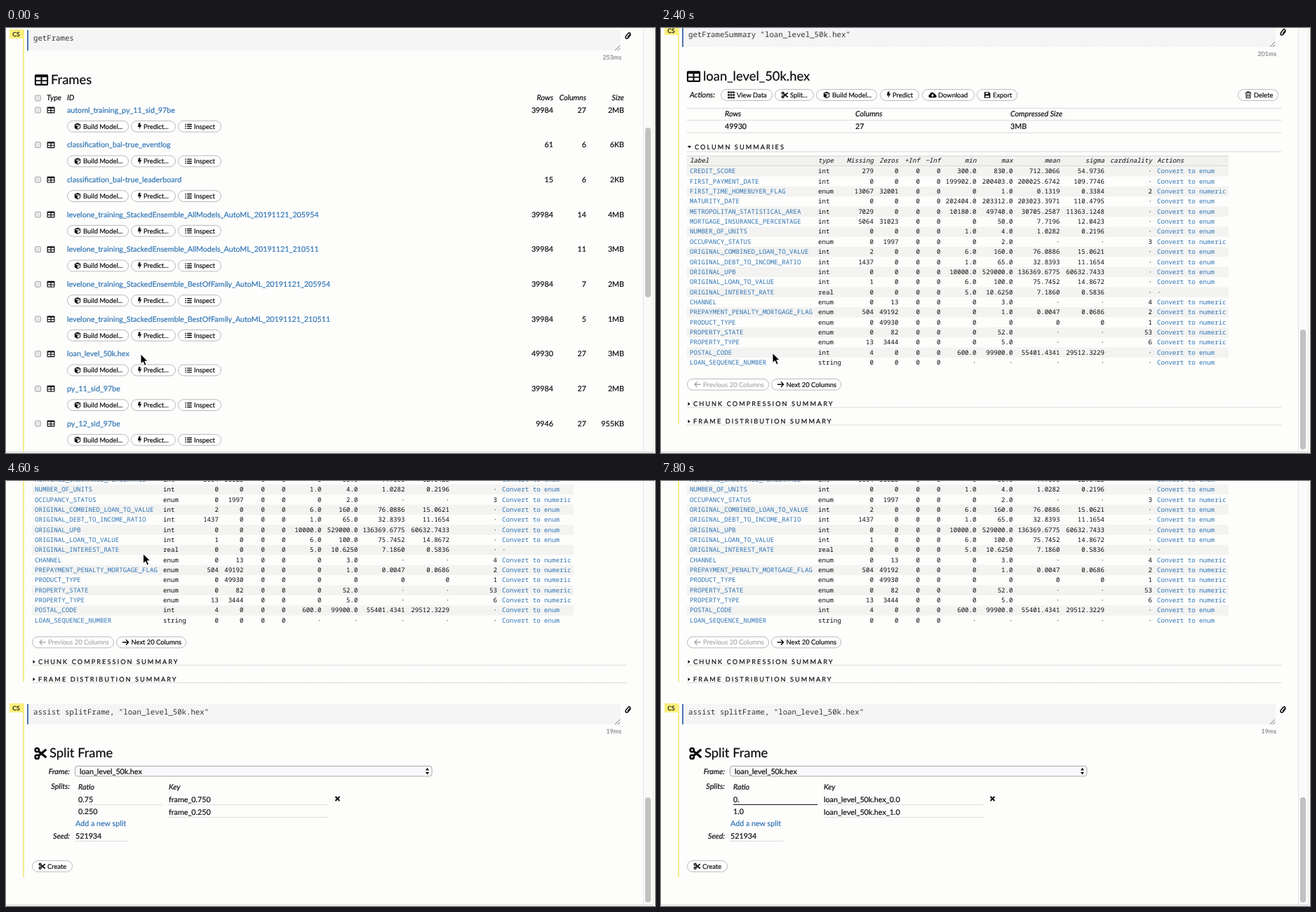
Recreate the animation shown at these times as an HTML page. Size 925 by 606 pixels, loop 8000 ms.

```html
<!DOCTYPE html>
<html lang="en">
<head>
<meta charset="utf-8">
<title>Notebook frames</title>
<style>
html, body { margin: 0; width: 100%; height: 100%; overflow: hidden; background: #fdfdfc; }
svg { display: block; width: 100%; height: 100%; }
text {
  font: 10.72px Lato, sans-serif; color: #0c0c0c; fill: currentColor; stroke: currentColor; stroke-width: .2;
  text-rendering: geometricPrecision; white-space: pre;
}
.italic { font-style: italic; }
.end { text-anchor: end; }
.mid { text-anchor: middle; }
.title { font-size: 18.4px; }
.button { font-size: 9.4px; }
.time { font-size: 8.9px; color: #888; }
.tag { font-size: 8.6px; }
.caps { font-size: 9.2px; letter-spacing: 2.05px; }
.code, .cell { font-family: "Noto Sans Mono", "Liberation Mono", monospace; stroke-width: 0; }
.code { font-size: 10.7px; color: #333; }
.cell { font-size: 9.12px; }
.link { color: #2f74b3; }
.hover { color: #23527c; text-decoration: underline; }
.dots { stroke: #bbb; stroke-dasharray: 1 1; }
.pill { fill: #fff; stroke: #b8b8b8; }
.line { fill: none; stroke: currentColor; stroke-width: 1.5; }
</style>
</head>
<body>
<svg viewBox="0 0 925 606" preserveAspectRatio="none">
  <defs>
    <pattern id="hatch" width="4" height="4" patternUnits="userSpaceOnUse">
      <path d="M0 0h4v4H0z" fill="#f7f7f7"/><path d="M-1 1l2-2M0 4l4-4M3 5l2-2" stroke="#eeeeee"/>
    </pattern>
    <linearGradient id="fade"><stop stop-color="#c9c49c"/><stop offset="1" stop-color="#c9c49c" stop-opacity="0"/></linearGradient>
  </defs>
  <g id="list"></g>
  <g id="summary"></g>
  <g id="split"></g>
  <path d="M0 604.5H923" stroke="#d2d2d0"/>
  <g id="newCell">
    <path d="M25 604h898v1.500H25z" fill="#efe9b4"/>
    <path d="M25 603.500h186v1.500H25z" fill="url(#fade)"/>
  </g>
  <path d="M908 0h15v604h-15z" fill="#fafafa"/>
  <path d="M908.5 0v604" stroke="#e4e4e4"/>
  <path d="M922.5 0v604" stroke="#ebe8d4"/>
  <rect id="thumb" x="911" width="8" rx="4" fill="#c1c1c1"/>
  <g id="pointer" stroke-linejoin="round">
    <path id="arrow" d="M0 0v14l3.300-3 2.300 5.300 2.500-1.100-2.300-5.100h4.400z" fill="#000" stroke="#fff"/>
    <path id="hand" d="M-1.500 1.500q0-1.700 1.500-1.700t1.500 1.700v4.500q2.400-.8 2.700.7 2.100-.6 2.400.8 2-.3 2 1.500v3q0 2-1.600 5h-7.500q-1-2.400-3-4.500-2-2.600-1.300-3.400 1.200-1 3.300 1.200z" fill="#fff" stroke="#000"/>
    <path id="beam" d="M-2.500-6q2.500 0 2.500 2v8q0 2 2.500 2M2.500-6q-2.500 0-2.500 2M-2.500 6q2.500 0 2.500-2M-1.500 1h3" fill="none" stroke="#222"/>
  </g>
</svg>
<script>
const $ = id => document.getElementById(id);

const text = (x, y, s, cls = '', attrs = '') => `<text x="${x}" y="${y}" class="${cls}" ${attrs}>${s}</text>`;
const rect = (x, y, w, h, attrs) => `<rect x="${x}" y="${y}" width="${w}" height="${h}" ${attrs}/>`;
const dots = (x1, x2, y) => `<path class="dots" d="M${x1} ${y}H${x2}"/>`;

// Icons are centred on the origin, about 10 px wide.
const icons = {
  cube: '<path d="M0-5l4.500 2v5.500L0 5l-4.500-2.500V-3z"/><path d="M-3.500-2.300L0-.8l3.500-1.500M0 .5v3.200l3.300-1.800V-1z" fill="#fff" stroke="#fff" stroke-width=".4"/>',
  bolt: '<path d="M-1.500-5h3L.4-1.800 3-2.300-.8 5l.7-4.600-2.700.6z"/>',
  list: '<path class="line" d="M-5-3h1.700M-5 0h1.700M-5 3h1.700M-2-3h7M-2 0h7M-2 3h7"/>',
  table: '<path fill-rule="evenodd" d="M-4.500-4.500h9q1 0 1 1v7q0 1-1 1h-9q-1 0-1-1v-7q0-1 1-1zM-4.300-2.200v2.300h3.700v-2.300zM.6-2.200v2.300h3.700v-2.300zM-4.300 1.100v2.200h3.700V1.100zM.6 1.100v2.200h3.700V1.100z"/>',
  grid: '<path d="M-5.200-4H5.200M-5.200 0H5.200M-5.200 4H5.200" stroke="currentColor" stroke-width="2.600" stroke-dasharray="3 .7"/>',
  scissors: '<g fill="none" stroke="currentColor" stroke-width="1.500"><circle cx="-3" cy="-2.800" r="1.500"/><circle cx="-3" cy="2.800" r="1.500"/><path d="M-1.800-1.900L4.500 3.300M-1.800 1.900L4.500-3.300" stroke-width="1.900"/></g>',
  cloud: '<path d="M-3.800 4Q-6 3.700-6 1.500-6-.4-4-.8-3.700-4-.6-4 1.700-4 2.500-1.900q2-.2 2 1.500Q6 .3 6 2 6 4 4 4z"/><path d="M-.8-1.500h1.600v2h1.500L0 3-2.300.5h1.500z" fill="#fff"/>',
  save: '<path d="M-4.500-4.500h7l2 2v7h-9z"/><path d="M-2.500-3.500h4v2.300h-4zM-2.800 1h5.600v2.500h-5.600z" fill="#fff"/>',
  trash: '<path d="M-4.300-3.500h8.600M-1.500-3.500v-1.300h3v1.300M-3.300-3l.3 7.500h6l.3-7.500M-1.200-1.500v4.500M1.200-1.500v4.500" fill="none" stroke="currentColor" stroke-width="1.100"/>',
  left: '<path class="line" d="M5 0H-4M-.5-4L-4.300 0-.5 4"/>',
  right: '<path class="line" d="M-5 0H4M.5-4L4.300 0 .5 4"/>',
  clip: '<path d="M-1 2.800l3.300-4q1-1.500-.2-2.300-1.200-.7-2.200.5l-3.400 4.300q-1.200 2 .3 3 1.500.9 3-.8l3.700-4.600" fill="none" stroke="currentColor" stroke-width="1.500"/>',
  cross: '<path d="M-3-3l6 6M3-3l-6 6" stroke="currentColor" stroke-width="2"/>'
};
const icon = (name, x, y, scale = 1, color = '#0c0c0c') =>
  `<g transform="translate(${x} ${y}) scale(${scale})" fill="${color}" color="${color}">${icons[name]}</g>`;

function button(x, right, cy, name, label, color = '#0c0c0c', attrs = '') {
  const [iconX, textX] = { bolt: [12.5, 18], scissors: [14.5, 22], right: [13.5, 21.5] }[name] || [15, 23];
  return rect(x + .5, cy - 7.9, right - x - 1, 15.8, `rx="7.900" class="pill" ${attrs}`) +
    icon(name, x + iconX, cy, .95, color) + text(x + textX, cy + 3.3, label, 'button', `style="color:${color}"`);
}

const checkbox = y => rect(41.5, y - 4, 8, 8, 'rx="1.500" fill="#e6e6e6" stroke="#aaa"');

// Input cell whose code box ends at `bottom`.
const inputCell = (bottom, code, time, end) =>
  `<path d="M25 ${bottom - 29}V${end}" stroke="#f5eb8c" stroke-width="2"/>` +
  rect(5, bottom - 30, 20, 13, 'fill="#fbf07c"') + text(14.5, bottom - 20, 'CS', 'tag mid') +
  rect(30, bottom - 29, 846, 29, 'fill="url(#hatch)"') + rect(30, bottom - 29, 2, 29, 'fill="#4a76ae"') +
  text(39, bottom - 14.5, code, 'code') +
  `<path d="M868 ${bottom}l7-7M872 ${bottom}l3-3" stroke="#777"/>` +
  icon('clip', 887, bottom - 21.5) + text(877, bottom + 13, time, 'time end');

const frames = `automl_training_py_11_sid_97be 39984 27 2MB
classification_bal-true_eventlog 61 6 6KB
classification_bal-true_leaderboard 15 6 2KB
levelone_training_StackedEnsemble_AllModels_AutoML_20191121_205954 39984 14 4MB
levelone_training_StackedEnsemble_AllModels_AutoML_20191121_210511 39984 11 3MB
levelone_training_StackedEnsemble_BestOfFamily_AutoML_20191121_205954 39984 7 2MB
levelone_training_StackedEnsemble_BestOfFamily_AutoML_20191121_210511 39984 5 1MB
loan_level_50k.hex 49930 27 3MB
py_11_sid_97be 39984 27 2MB
py_12_sid_97be 9946 27 955KB
py_13_sid_97be 2 2 641Bytes
py_1_sid_97be 10 27 21KB
py_22_sid_97be 9946 2 107KB`.split('\n').map(row => row.split(' '));

function frameRow([id, rows, columns, size], i) {
  const y = 117 + 49.67 * i;
  const attrs = id.startsWith('loan') ? 'id="loanLink"' : '';
  return checkbox(y) + icon('table', 64, y) + text(87, y + 3.6, id, 'link', attrs) +
    text(780, y + 3.6, rows, 'end') + text(827, y + 3.6, columns, 'end') + text(881, y + 3.6, size, 'end') +
    button(87, 175, y + 23.3, 'cube', 'Build Model...') +
    button(178, 242, y + 23.3, 'bolt', 'Predict...') +
    button(245, 307, y + 23.3, 'list', 'Inspect');
}

$('list').innerHTML = `<g id="listCell">${inputCell(32, 'getFrames', '253ms', 604)}</g>` +
  icon('table', 50.5, 74, 1.75) + text(64, 80, 'Frames', 'title') + checkbox(100) +
  text(58, 103.3, 'Type', 'italic') + text(87, 103.3, 'ID', 'italic') +
  [['Rows', 780], ['Columns', 827], ['Size', 881]].map(([s, x]) => text(x, 103.3, s, 'italic end')).join('') +
  frames.map(frameRow).join('');

// label, type, missing, zeros, min, max, mean, sigma, cardinality, conversion
const columns = `CREDIT_SCORE int 279 0 300.0 830.0 712.3066 54.9736 · enum
FIRST_PAYMENT_DATE int 0 0 199902.0 200403.0 200025.6742 109.7746 · enum
FIRST_TIME_HOMEBUYER_FLAG enum 13067 32001 0 1.0 0.1319 0.3384 2 numeric
MATURITY_DATE int 0 0 202404.0 203312.0 203023.3971 110.4795 · enum
METROPOLITAN_STATISTICAL_AREA int 7029 0 10180.0 49740.0 30705.2587 11363.1248 · enum
MORTGAGE_INSURANCE_PERCENTAGE int 5064 31023 0 50.0 7.7196 12.0423 · enum
NUMBER_OF_UNITS int 0 0 1.0 4.0 1.0282 0.2196 · enum
OCCUPANCY_STATUS enum 0 1997 0 2.0 · · 3 numeric
ORIGINAL_COMBINED_LOAN_TO_VALUE int 2 0 6.0 160.0 76.0886 15.0621 · enum
ORIGINAL_DEBT_TO_INCOME_RATIO int 1437 0 1.0 65.0 32.8393 11.1654 · enum
ORIGINAL_UPB int 0 0 10000.0 529000.0 136369.6775 60632.7433 · enum
ORIGINAL_LOAN_TO_VALUE int 1 0 6.0 100.0 75.7452 14.8672 · enum
ORIGINAL_INTEREST_RATE real 0 0 5.0 10.6250 7.1860 0.5836 · ·
CHANNEL enum 0 13 0 3.0 · · 4 numeric
PREPAYMENT_PENALTY_MORTGAGE_FLAG enum 504 49192 0 1.0 0.0047 0.0686 2 numeric
PRODUCT_TYPE enum 0 49930 0 0 0 0 1 numeric
PROPERTY_STATE enum 0 82 0 52.0 · · 53 numeric
PROPERTY_TYPE enum 13 3444 0 5.0 · · 6 numeric
POSTAL_CODE int 4 0 600.0 99900.0 55401.4341 29512.3229 · enum
LOAN_SEQUENCE_NUMBER string 0 0 · · · · · enum`.split('\n').map(row => row.split(' '));

const numberEdges = [303, 338.5, 369, 398.5, 449.5, 501.5, 568.5, 632, 700];
const numberCells = (y, values, cls) => values.map((v, i) => text(numberEdges[i], y, v, 'cell end ' + cls)).join('');

function columnRow([label, type, missing, zeros, ...rest], i) {
  const y = 204.3 + 14.36 * i, action = rest.pop();
  return (i % 2 ? '' : rect(37, y - 7.2, 772, 14.4, 'fill="#f3f3f2"')) +
    text(41, y + 3, label, 'cell link') + text(224, y + 3, type, 'cell') +
    numberCells(y + 3, [missing, zeros, 0, 0, ...rest], '') +
    (action === '·' ? text(707, y + 3, '·', 'cell') : text(707, y + 3, 'Convert to ' + action, 'cell link'));
}

const section = (y, label, open) =>
  `<path d="${open ? `M38 ${y - 2}h5l-2.500 3.500z` : `M38.500 ${y - 2.5}v5l3-2.500z`}"/>` +
  text(open ? 48 : 46, y + 3.4, label, 'caps') + dots(37, 885, y + (open ? 6.5 : 5));

$('summary').innerHTML = inputCell(27, 'getFrameSummary "loan_level_50k.hex"', '201ms', 565) +
  icon('table', 46.5, 69, 1.75) + text(60, 75.2, 'loan_level_50k.hex', 'title') +
  text(41, 98.7, 'Actions:', 'italic') +
  rect(161, 85.5, 58, 20, 'id="splitRing" rx="2" fill="none" stroke="#5d9cec" stroke-width="3"') +
  button(85, 159, 95.5, 'grid', 'View Data') +
  button(162, 218, 95.5, 'scissors', 'Split...', '#0c0c0c', 'id="splitButton"') +
  button(221, 308, 95.5, 'cube', 'Build Model...') +
  button(312, 368, 95.5, 'bolt', 'Predict') +
  button(372, 447, 95.5, 'cloud', 'Download') +
  button(450, 508, 95.5, 'save', 'Export') +
  button(822, 880, 95.5, 'trash', 'Delete') +
  [114.5, 131.5, 149.5].map(y => dots(37, 885, y)).join('') +
  [['Rows', '49930', 91], ['Columns', '27', 277], ['Compressed Size', '3MB', 498]]
    .map(([name, value, x]) => text(x, 126, name, 'italic') + text(x, 144.2, value)).join('') +
  section(170, 'COLUMN SUMMARIES', true) +
  rect(37, 182, 772, 14.5, 'fill="#f1f1f0"') + dots(37, 809, 182.5) + dots(37, 809, 196.5) +
  [['label', 41], ['type', 224], ['Actions', 707]].map(([s, x]) => text(x, 192.3, s, 'cell italic')).join('') +
  numberCells(192.3, 'Missing Zeros +Inf −Inf min max mean sigma cardinality'.split(' '), 'italic') +
  columns.map(columnRow).join('') +
  button(37, 154, 508.3, 'left', 'Previous 20 Columns', '#aaa') +
  button(157, 257, 508.3, 'right', 'Next 20 Columns') +
  section(536, 'CHUNK COMPRESSION SUMMARY') + section(561, 'FRAME DISTRIBUTION SUMMARY');

$('split').innerHTML = inputCell(347, 'assist splitFrame, "loan_level_50k.hex"', '19ms', 565) +
  icon('scissors', 49.5, 388.5, 1.75) + text(62, 394.3, 'Split Frame', 'title') +
  [['Frame:', 417.5], ['Splits:', 439], ['Seed:', 510]].map(([s, y]) => text(91, y, s, 'italic end')).join('') +
  rect(98.5, 406.5, 508.5, 14.5, 'rx="3.500" fill="#f9f9fb" stroke="#a9a9a9"') +
  '<path d="M598 412.500l2.500-3.500 2.500 3.500zM598 415l2.500 3.500 2.500-3.500z"/>' +
  text(105, 417.5, 'loan_level_50k.hex') +
  text(103, 439.5, 'Ratio', 'italic') + text(232, 439.5, 'Key', 'italic') +
  text(103, 457.7, '', '', 'id="ratio"') + text(103, 475.2, '', '', 'id="rest"') +
  text(232, 457.7, '', '', 'id="firstKey"') + text(232, 476, '', '', 'id="secondKey"') +
  dots(103, 223, 461.5) + '<path id="focusLine" d="M103 461.500h120" stroke="#111"/>' +
  dots(232, 460, 461.5) + dots(232, 460, 479.5) + dots(99, 174, 513.5) +
  icon('cross', 472.5, 453) + text(99, 492.3, 'Add a new split', 'link') + text(99, 510.3, '521934') +
  button(37, 95, 549.3, 'scissors', 'Create');

const pointerPath = [
  [0, 192, 465], [200, 192, 465], [800, 165, 465], [1800, 165, 465], [2200, 159, 463.5], [2400, 159, 463.5],
  [3200, 266, 185], [3800, 190, 97.5], [4400, 190, 97.5], [4800, 201, 110], [5000, 201, 110],
  [5800, 132, 454], [8000, 132, 454]
];

function pointerAt(t) {
  const i = pointerPath.findIndex(point => point[0] > t);
  const [t0, x0, y0] = pointerPath[i - 1], [t1, x1, y1] = pointerPath[i];
  const p = (t - t0) / (t1 - t0), ease = p * p * (3 - 2 * p);
  return [x0 + (x1 - x0) * ease, y0 + (y1 - y0) * ease];
}

const show = (id, on) => $(id).setAttribute('display', on ? 'inline' : 'none');
const move = (id, x, y) => $(id).setAttribute('transform', `translate(${x} ${y})`);
const between = (t, a, b) => t >= a && t < b;

function draw(t) {
  const scrolled = t >= 2200, summary = t >= 2400, split = t >= 4600;

  show('list', !summary);
  show('summary', summary);
  show('split', split);
  show('listCell', !scrolled);
  show('newCell', scrolled && !summary);
  move('list', 0, scrolled ? -118.5 : 0);
  move('summary', 0, split ? -278.3 : 0);
  $('loanLink').setAttribute('class', t >= 600 ? 'link hover' : 'link');

  const [top, bottom] = split ? [451, 601] : summary ? [430, 601] : scrolled ? [185, 419] : [142, 384];
  $('thumb').setAttribute('y', top);
  $('thumb').setAttribute('height', bottom - top);

  show('splitRing', between(t, 4200, 4600));
  $('splitButton').style.fill = between(t, 3800, 4600) ? '#ececec' : '#fff';

  const [ratio, rest, first, second] =
    t < 7000 ? ['0.75', '0.250', 'frame_0.750', 'frame_0.250'] :
    t < 7400 ? ['0.7', '0.30', 'loan_level_50k.hex_0.70', 'loan_level_50k.hex_0.30'] :
    ['0.', '1.0', 'loan_level_50k.hex_0.0', 'loan_level_50k.hex_1.0'];
  $('ratio').textContent = ratio;
  $('rest').textContent = rest;
  $('firstKey').textContent = first;
  $('secondKey').textContent = second;
  show('focusLine', t >= 6200);

  const hand = between(t, 600, 2000) || between(t, 3800, 4600), beam = t >= 5800;
  show('hand', hand);
  show('beam', beam);
  show('arrow', !hand && !beam);
  show('pointer', t < 7000);
  move('pointer', ...pointerAt(t));
}

const loop = 8000, step = 200;
let last = -1;
function tick(now) {
  const t = Math.floor(now % loop / step) * step;
  if (t !== last) draw(last = t);
  requestAnimationFrame(tick);
}
draw(0);
requestAnimationFrame(tick);
</script>
</body>
</html>
```
